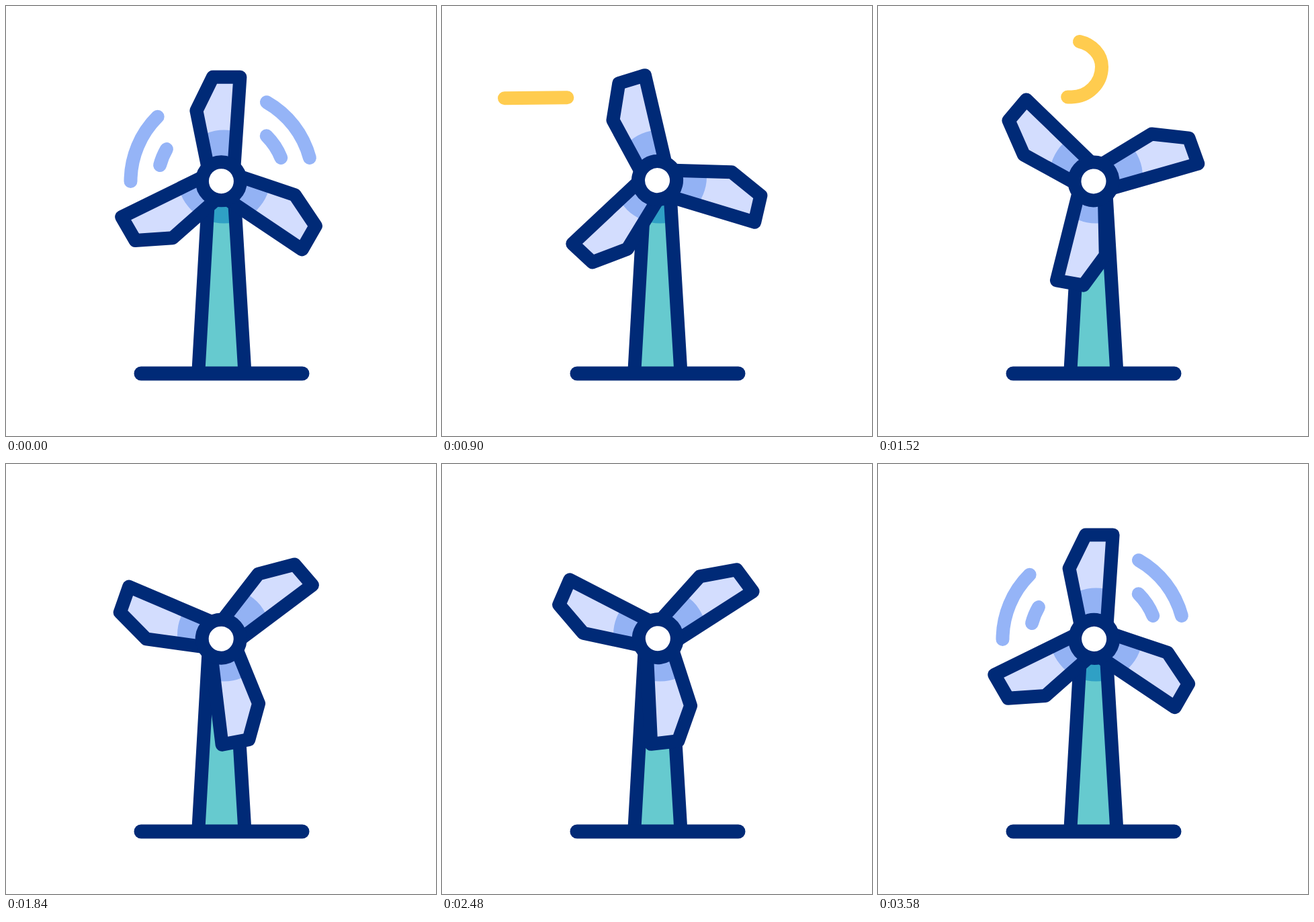
An HTML page for the animation above (3.6 s loop, 640 by 640 pixels).

```html
<!DOCTYPE html>
<html lang="en">
<head>
<meta charset="utf-8">
<title>Wind turbine</title>
<style>
  html, body { margin: 0; width: 100%; height: 100%; overflow: hidden; background: #fff; }
  svg { display: block; width: 100vw; height: 100vh; }
  path, circle { stroke-width: 20; stroke-linejoin: round; }
  .navy { fill: none; stroke: #002a77; }
  .trim { fill: none; stroke-linecap: round; }
  .swoosh { stroke: #95b4f7; }
  .wind { stroke: #ffcc4f; }
</style>
</head>
<body>
<svg viewBox="0 0 640 640">
  <defs>
    <path id="blades"/>
    <path id="tower" d="M286.5 542 L301.2 285 H339.8 L355.2 542"/>
    <clipPath id="bladeClip"><use href="#blades"/></clipPath>
    <clipPath id="towerClip"><use href="#tower"/></clipPath>
    <circle id="shadow" cx="324.5" cy="254" r="69.5"/>
  </defs>

  <use href="#tower" fill="#66cacf"/>
  <g clip-path="url(#towerClip)"><use href="#shadow" fill="#2fa0c5"/></g>
  <use href="#tower" class="navy"/>
  <path class="navy" d="M201 547 H441" stroke-linecap="round" style="stroke-width:21"/>

  <g id="swooshes" transform="translate(321 261)"></g>

  <g id="rotor">
    <use href="#blades" fill="#d3ddfe"/>
    <g clip-path="url(#bladeClip)"><use id="bladeShadow" href="#shadow" fill="#93b2f4"/></g>
    <use href="#blades" class="navy"/>
    <circle r="28.5" fill="#fff" stroke="#002a77"/>
  </g>

  <path id="wind" class="trim wind" pathLength="1"
    d="M93 137.2 L288 135.4 A45 45 0 0 0 333 90.5 C333 72 318 57 300 53"/>
</svg>
<script>
const LOOP = 3600;
const PIVOT = [320.9, 260.2];
const HUB = [-.5, .5]; // hub sits slightly off the pivot
const byId = id => document.getElementById(id);
const rotor = byId('rotor'), bladeShadow = byId('bladeShadow'), wind = byId('wind');

const rotate = ([x, y], deg) => {
  const a = deg * Math.PI / 180, c = Math.cos(a), s = Math.sin(a);
  return [x * c - y * s, x * s + y * c];
};

const blade = [[-20, -21], [-37, -105], [-12.5, -155], [28, -155], [19, -21]];
byId('blades').setAttribute('d', [0, 120, 240]
  .map(deg => 'M' + blade.map(p => rotate(p, deg)).join('L')).join(''));

// radius, start angle, end angle
const swooshes = [[135.5, 180, 225.3], [95, 194.6, 210.3], [135.5, -60.4, -15], [95, -45.4, -21.7]]
  .map(([r, from, to]) => {
    const path = document.createElementNS('http://www.w3.org/2000/svg', 'path');
    path.setAttribute('class', 'trim swoosh');
    path.setAttribute('pathLength', 1);
    path.setAttribute('d', `M${rotate([r, 0], from)} A${r} ${r} 0 0 1 ${rotate([r, 0], to)}`);
    return byId('swooshes').appendChild(path);
  });

// time, angle, speed in degrees per ms
const spin = [
  [160, 0, 0], [620, 38.7, .172], [1200, 197.6, .346], [1840, 409, .264],
  [2480, 533.3, .1375], [2880, 576.2, .0752], [3560, 600, 0]
];

function angleAt(t) {
  if (t <= spin[0][0]) return 0;
  const i = spin.findIndex(key => key[0] > t);
  if (i < 0) return 600;
  const [t0, a0, v0] = spin[i - 1], [t1, a1, v1] = spin[i];
  const d = t1 - t0, u = (t - t0) / d, w = 1 - u;
  return a0 * w * w * (1 + 2 * u) + a1 * u * u * (3 - 2 * u) + d * u * w * (v0 * w - v1 * u);
}

function ease(t, from, to) {
  const u = Math.min(1, Math.max(0, (t - from) / (to - from)));
  return u * u * (3 - 2 * u);
}

function trim(path, start, end) {
  const length = end - start;
  path.style.visibility = length > .001 ? 'visible' : 'hidden';
  path.style.strokeDasharray = `${length} 3`;
  path.style.strokeDashoffset = -start;
}

// The shadow stays in place while the blades turn through it.
function turn(angle) {
  const minus = ([x, y]) => `translate(${-x} ${-y})`;
  rotor.setAttribute('transform', `translate(${PIVOT}) rotate(${angle}) translate(${HUB})`);
  bladeShadow.setAttribute('transform', `${minus(HUB)} rotate(${-angle}) ${minus(PIVOT)}`);
}

function draw(now) {
  const t = now % LOOP;
  turn(angleAt(t));
  trim(wind, ease(t, 1240, 1740), ease(t, 740, 1190));
  for (const path of swooshes) {
    if (t < 1800) trim(path, ease(t, 170, 580), 1);
    else trim(path, 0, ease(t, 2700, 3230));
  }
  requestAnimationFrame(draw);
}
requestAnimationFrame(draw);
</script>
</body>
</html>
```
